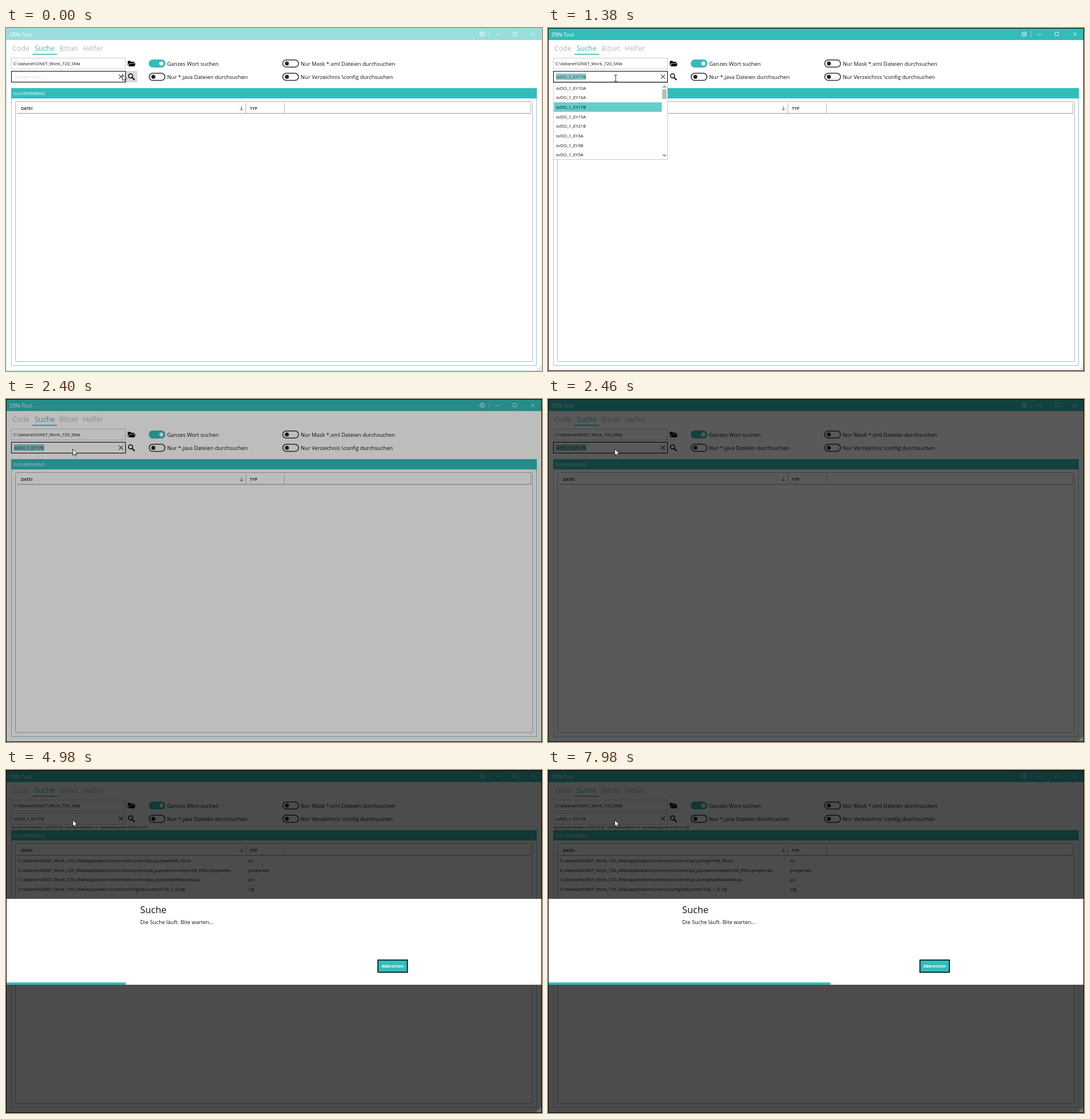
These frames come from a looping animation (935 px wide and 599 px high, 8000 ms). An HTML page:

```html
<!DOCTYPE html>
<html lang="de">
<head>
<meta charset="utf-8">
<title>Suche</title>
<style>
html, body { margin: 0; width: 100%; height: 100%; overflow: hidden; background: #fff; }
svg { display: block; width: 935px; height: 599px; }
text { font-family: "Open Sans", "Noto Sans", sans-serif; font-size: 7.6px; fill: #111; white-space: pre; }
.mid { font-size: 9.44px; }
.tab { font-size: 12.4px; fill: #b8b8b8; }
.teal { fill: #33bcb9; }
.white { fill: #fff; }
.head { font-size: 7.4px; font-weight: 600; }
.line { fill: none; stroke: #b4b4b4; }
</style>
</head>
<body>
<svg viewBox="0 0 935 599">
  <rect class="white" width="935" height="599"/>

  <rect id="bar" width="935" height="21"/>
  <text class="mid white" x="6" y="14.7">ZRN-Tool</text>
  <g fill="none" stroke="#fff" opacity=".85">
    <circle cx="830.5" cy="10.8" r="3.5"/>
    <circle cx="830.5" cy="10.8" r="4.3" stroke-dasharray="1.7 1.68"/>
    <circle cx="830.5" cy="10.8" r="1.4" stroke-width=".8"/>
    <path d="M842.5 6v10" opacity=".4"/>
    <path d="M854 11.5h7M884.5 7.5h6v6h-6zM916 7.5l6 6.5M922 7.5l-6 6.5" stroke-width=".9"/>
  </g>

  <text class="tab" x="11" y="40">Code</text>
  <text class="tab teal" x="50" y="40">Suche</text>
  <text class="tab" x="93" y="40">Bitset</text>
  <text class="tab" x="134" y="40">Helfer</text>
  <rect class="teal" x="46" y="45" width="43" height="1.6"/>

  <rect class="line" x="9.5" y="52.5" width="199" height="19" stroke="#ccc" style="stroke:#ccc"/>
  <text x="13" y="65.2">C:\datanet\DNET_Work_720_SMa</text>
  <path d="M212.5 66V57.5h4.5l1.2 1.5h5.8v2h-8.5zM213.5 67l2.4-5.3h10.3l-2.2 5.3z"/>

  <rect id="hover" x="209" y="75" width="20" height="20" fill="#dadada"/>
  <rect id="field" class="white" x="9.5" y="75.5" width="199" height="19"/>
  <rect id="sel" x="14" y="79.5" width="52.5" height="11" fill="#88c8c7"/>
  <text id="hint" x="15" y="88.2" style="fill:#d2d2d2">Suchen nach...</text>
  <text id="query" x="14" y="88.2"></text>
  <path d="M197 81.5l7 7M204 81.5l-7 7" stroke="#555" stroke-width="1.2"/>
  <g fill="none" stroke="#000">
    <circle cx="217.3" cy="83.6" r="3.6" stroke-width="1.5"/>
    <path d="M220 86.5l4.4 4.3" stroke-width="2"/>
  </g>
  <text id="status" x="10" y="102.4" style="font-size:5.6px"></text>

  <g id="toggles"></g>

  <rect x="9.5" y="105.5" width="916" height="484" fill="none" stroke="#8accca"/>
  <rect class="teal" x="9" y="105" width="917" height="18"/>
  <text class="white" x="12.5" y="117">SUCHERGEBNIS</text>
  <rect class="line" x="16.5" y="128.5" width="902" height="454" rx="2"/>
  <path class="line" d="M418.5 131v17M485.5 131v17M915.5 131v17"/>
  <path class="line" d="M19 149.2h897" stroke-width="1.6"/>
  <text class="head" x="26" y="143">DATEI</text>
  <text class="head" x="425.5" y="143">TYP</text>
  <path d="M410.8 136.5v7M408 140.8l2.8 2.8 2.8-2.8" fill="none" stroke="#555"/>
  <g id="rows"></g>

  <g id="list">
    <rect x="9.5" y="95.5" width="199" height="134" fill="#fff" stroke="#ccc"/>
    <rect id="mark" x="10.5" width="188" height="16.6" fill="#66cdcb"/>
    <g id="items"></g>
    <path d="M199 104l4-4 4 4zM199 221l4 4 4-4z" fill="#a0a0a0"/>
    <rect x="199" y="107" width="8" height="17" fill="#bdbdbd"/>
  </g>

  <rect id="shade" width="935" height="599"/>
  <g id="dialog">
    <rect class="white" y="225" width="935" height="150"/>
    <text x="234" y="250" style="font-size:16.3px">Suche</text>
    <text x="234" y="268.8" style="font-size:9.4px">Die Suche läuft. Bite warten...</text>
    <rect class="teal" x="648.75" y="331.75" width="51.5" height="21.5" stroke="#000" stroke-width="1.5"/>
    <text class="white" x="674.5" y="345.3" text-anchor="middle" style="font-size:7.2px;font-weight:700">Abbrechen</text>
    <rect id="progress" class="teal" y="371" height="4"/>
  </g>
  <g id="grip" fill="#b9b9b9"></g>
  <rect id="frame" x=".5" y=".5" width="934" height="598" fill="none"/>

  <path id="beam" d="M-2.5-5.5h2l.5.7.5-.7h2M0-5V5M-2.5 5.5h2l.5-.7.5.7h2" fill="none" stroke="#222"/>
  <path id="arrow" d="M0 0V10.8L2.5 8.5 4.2 12.3 6 11.5 4.4 7.8H7.8z" fill="#fff" stroke="#000" stroke-width=".8"/>
</svg>
<script>
const LOOP = 8000, TICK = 30, TOTAL = 10158;
const $ = id => document.getElementById(id);
const set = (id, attrs) => { for (const k in attrs) $(id).setAttribute(k, attrs[k]); };
const show = (id, on) => set(id, { visibility: on ? 'visible' : 'hidden' });
const label = (x, y, s, cls = '') => `<text class="${cls}" x="${x}" y="${y}">${s}</text>`;

// Linear interpolation through [time, value] points.
function at(points, t) {
  if (t <= points[0][0]) return points[0][1];
  for (let i = 1; i < points.length; i++) {
    const [a, u] = points[i - 1], [b, v] = points[i];
    if (t <= b) return u + (v - u) * (t - a) / (b - a);
  }
  return points[points.length - 1][1];
}

const toggle = (x, y, s, on) =>
  `<rect x="${x + .75}" y="${y - 6.25}" width="27.5" height="12.5" rx="6.25" stroke-width="1.5"
    fill="${on ? '#33bcb9' : '#fff'}" stroke="${on ? '#33bcb9' : '#333'}"/>
   <circle cx="${x + (on ? 22 : 8)}" cy="${y}" r="3.5" fill="${on ? '#fff' : '#222'}"/>` +
  label(x + 32, y + 4, s, 'mid');

$('toggles').innerHTML =
  toggle(249, 62, 'Ganzes Wort suchen', true) +
  toggle(249, 85.3, 'Nur *.java Dateien durchsuchen') +
  toggle(482, 62, 'Nur Mask *.xml Dateien durchsuchen') +
  toggle(482, 85.3, 'Nur Verzeichnis \\config durchsuchen');

const names = ['10A', '16A', '17B', '19A', '21B', '3A', '3B', '5A'].map(s => 'svDO_1_EY' + s);
$('items').innerHTML = names.map((s, i) => label(14, 107.8 + i * 16.65, s)).join('');

let dots = '';
for (let r = 0; r < 4; r++)
  for (let c = 0; c <= r; c++)
    dots += `<rect x="${932 - c * 2}" y="${590 + r * 2}" width="1.2" height="1.2"/>`;
$('grip').innerHTML = dots;

// Hits in sorted order: time found, path, type.
const root = 'C:\\datanet\\DNET_Work_720_SMa\\application\\control\\';
const hits = [
  [4590, 'ieccontrol\\pa_pumpe\\HW_PA', '.sv'],
  [4620, 'ieccontrol\\pa_pumpe\\hmi\\text\\HW_PASv', '.properties'],
  [4560, 'ieccontrol\\pa_pumpe\\abPAaiodio', '.pu'],
  [2700, 'config\\kbus\\Dm272A_1_0', '.cfg']
];

const picks = [[1230, 0], [1290, 1], [1350, 2]];
const shade = [[2280, 0], [2310, .03], [2340, .08], [2370, .16], [2400, .26], [2430, .45], [2460, .65], [2609, .65], [2610, .7]];
const list = [[540, 0], [810, 1], [1590, 1], [1710, 0]];
const dialog = [[2580, 0], [2670, 1]];
const files = [[2460, 0], [3750, 1155], [4980, 2263], [5820, 2868], [6630, 3498], [7440, 4465], [7980, 5348]];
const clock = [[2460, 0], [3750, 2868], [4980, 5625], [7980, 12278]];
const mouseX = [[0, 203], [30, 194], [240, 118]];
const mouseY = [[0, 81], [30, 84], [240, 87.5]];

function draw(t) {
  const active = t >= 270, busy = t >= 2610;
  set('bar', { fill: active ? '#33bcb9' : '#99dedc' });
  set('frame', { stroke: active ? '#000' : '#99dedc', 'stroke-opacity': active ? 1 : .6 });
  set('field', { stroke: busy ? '#ccc' : '#000' });
  show('hover', t < 30);

  const pick = picks.filter(p => t >= p[0]).pop();
  show('hint', !pick);
  show('sel', pick && !busy);
  $('query').textContent = pick ? names[pick[1]] : '';
  set('query', { 'fill-opacity': busy ? 1 : .75 });
  set('mark', { y: 129.8 + ((pick ? pick[1] : 0) - 2) * 16.65, opacity: pick ? 1 : 0 });
  set('list', { opacity: at(list, t) });

  set('shade', { opacity: at(shade, t) });
  set('dialog', { opacity: at(dialog, t) });

  const n = Math.round(at(files, t)), ms = Math.round(at(clock, t));
  const found = hits.filter(h => t >= h[0]);
  set('progress', { width: n / TOTAL * 935 + .6 });
  $('status').textContent = busy
    ? `Durchsuchte Dateien: ${n}/${TOTAL}   Gefundene Dateien: ${found.length}   Verarbeitungszeit: 00:00:${(ms / 1000).toFixed(3).padStart(6, '0')}`
    : '';
  $('rows').innerHTML = found.map(([, path, type], i) => {
    const y = 161 + i * 16.65;
    return label(21, y, root + path + type) + label(421, y, type);
  }).join('');

  const pointer = t < 30 || t >= 2310;
  show('arrow', pointer);
  show('beam', !pointer && t < 2040);
  const tip = t < 30 ? '203 81' : '116.5 87.5';
  set('arrow', { transform: `translate(${tip})` });
  set('beam', { transform: `translate(${at(mouseX, t)} ${at(mouseY, t)})` });
}

const start = performance.now();
function loop(now) {
  const t = Math.max(0, now - start) % LOOP;
  draw(Math.floor(t / TICK) * TICK);
  requestAnimationFrame(loop);
}
draw(0);
requestAnimationFrame(loop);
</script>
</body>
</html>
```
